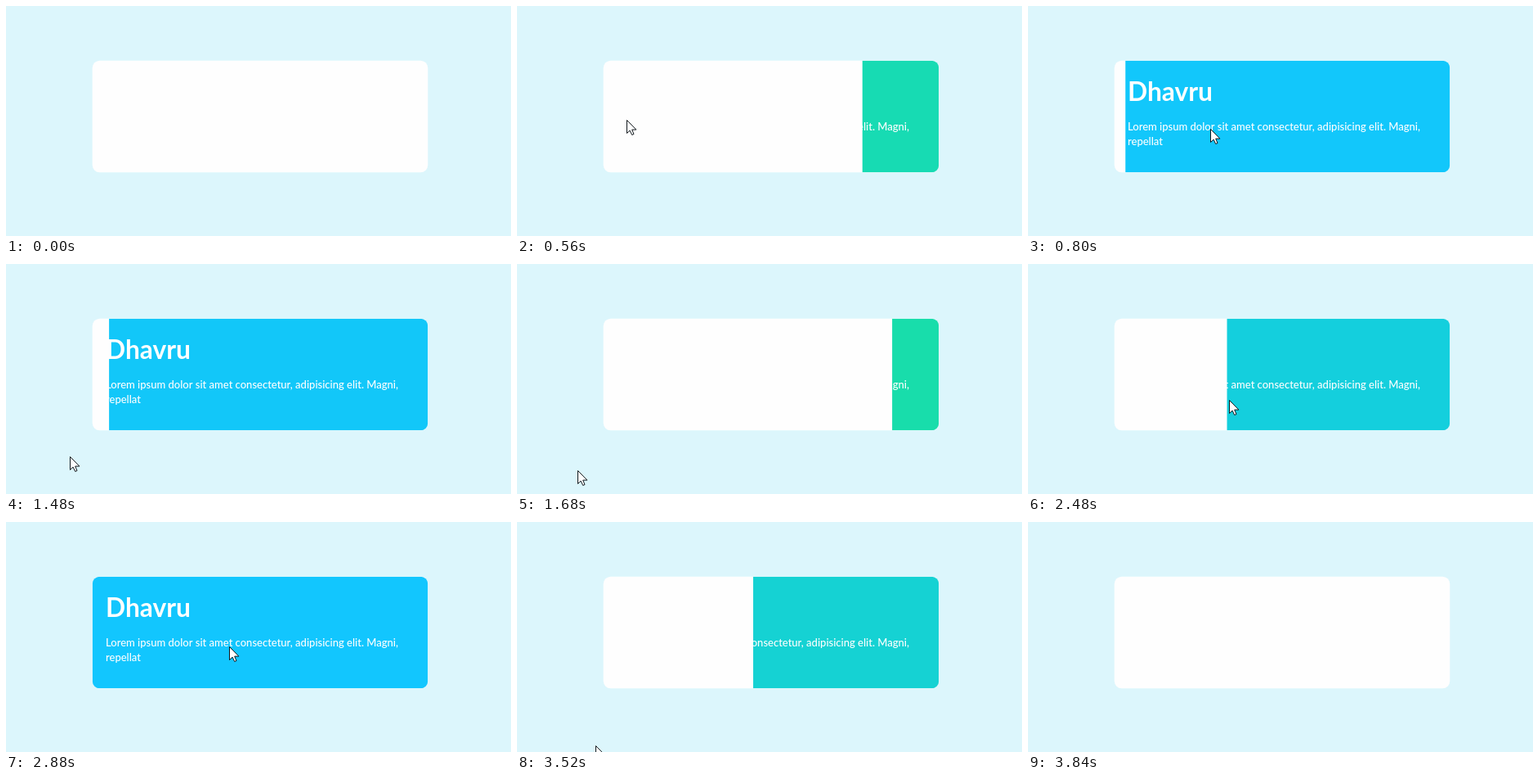
Write an HTML page with a canvas that moves like this. It is 618 px wide and 281 px high and loops after 4.04 s.

```html
<!DOCTYPE html>
<html lang="en">
<head>
<meta charset="utf-8">
<title>Wipe card</title>
<style>
  html, body { margin: 0; width: 100%; height: 100%; overflow: hidden; background: #dcf6fc; }
  canvas { display: block; width: 618px; height: 281px; }
</style>
</head>
<body>
<canvas id="stage"></canvas>
<script>
const W = 618, H = 281, LOOP = 4040, WIPE = 400;
const CARD = { x: 105.7, y: 66.7, w: 410.6, h: 136.6, r: 9 };
const FONT = 'Lato, "Open Sans", sans-serif';
const TITLE = 'Dhavru';
const LINES = ['Lorem ipsum dolor sit amet consectetur, adipisicing elit. Magni,', 'repellat'];
const WHITE = '#fefefe', GREEN = [25, 225, 157], BLUE = [18, 198, 254];

// Times at which the pointer enters and leaves the card, in turn
const HOVERS = [492, 1453.5, 2325, 3413];

// Pointer legs: where each ends, when it runs and at what pace
const steady = k => k;
const speedUp = k => k * k;
const slowDown = k => k * (2 - k);
const ENTRY = { x: 107, y: 192, at: 400 };
const LEGS = [
  { x: 134, y: 139, from: 400, to: 560, pace: steady },
  { x: 240, y: 152, from: 560, to: 960, pace: slowDown },
  { x: 78, y: 235, from: 1240, to: 1480, pace: steady },
  { x: 72, y: 257, from: 1480, to: 1880, pace: slowDown },
  { x: 273, y: 152, from: 2200, to: 2640, pace: slowDown },
  { x: 96, y: 273, from: 3160, to: 3520, pace: speedUp },
  { x: 98, y: 292, from: 3520, to: 3680, pace: steady }
];

const canvas = document.getElementById('stage');
const ctx = canvas.getContext('2d');
const dpr = window.devicePixelRatio || 1;
canvas.width = Math.round(W * dpr);
canvas.height = Math.round(H * dpr);
ctx.scale(dpr, dpr);

const mix = (a, b, k) => a + (b - a) * k;
const clamp = v => Math.min(1, Math.max(0, v));

// The CSS "ease" curve, cubic-bezier(.25, .1, .25, 1)
function ease(x) {
  if (x <= 0 || x >= 1) return clamp(x);
  const curve = (a, b, s) => 3 * a * s * (1 - s) ** 2 + 3 * b * s * s * (1 - s) + s ** 3;
  let lo = 0, hi = 1;
  for (let i = 0; i < 24; i++) {
    const mid = (lo + hi) / 2;
    if (curve(0.25, 0.25, mid) < x) lo = mid; else hi = mid;
  }
  return curve(0.1, 1, lo);
}

// Choose the font size at which the text has the given width
function fontFor(text, weight, width) {
  ctx.font = `${weight} 100px ${FONT}`;
  const size = 100 * width / ctx.measureText(text).width;
  return `${weight} ${size.toFixed(2)}px ${FONT}`;
}

const titleFont = fontFor(TITLE, 700, 104);
const bodyFont = fontFor(LINES[0], 500, 358);

// The picture refreshes more slowly near both ends of the loop
function snap(t) {
  const step = t < 1280 || t >= 3200 ? 80 : 40;
  return Math.floor(t / step) * step;
}

function wipeAt(t) {
  return clamp(HOVERS.reduce((p, at, i) => p + (i % 2 ? -1 : 1) * ease((t - at) / WIPE), 0));
}

function pointerAt(t) {
  let { x, y } = ENTRY;
  for (const leg of LEGS) {
    const k = leg.pace(clamp((t - leg.from) / (leg.to - leg.from)));
    x = mix(x, leg.x, k);
    y = mix(y, leg.y, k);
  }
  return [Math.round(x), Math.round(y)];
}

function drawCard(p) {
  const { x, y, w, h, r } = CARD;
  ctx.save();
  ctx.beginPath();
  ctx.roundRect(x, y, w, h, r);
  ctx.fillStyle = WHITE;
  ctx.fill();
  if (p > 0.001) {
    ctx.clip();
    ctx.fillStyle = `rgb(${GREEN.map((c, i) => Math.round(mix(c, BLUE[i], p)))})`;
    ctx.fillRect(x + w * (1 - p), y, w * p, h);
    ctx.fillStyle = WHITE;
    ctx.font = titleFont;
    ctx.fillText(TITLE, 122, 116);
    ctx.font = bodyFont;
    LINES.forEach((line, i) => ctx.fillText(line, 122, 152 + i * 18));
  }
  ctx.restore();
}

const arrow = new Path2D('M0 0V16L3.6 12.6L6.2 18L8.5 17L6.2 11.6H11.4Z');

function drawPointer([x, y]) {
  ctx.save();
  ctx.translate(x + 0.5, y + 0.5);
  ctx.fillStyle = '#fff';
  ctx.fill(arrow);
  ctx.strokeStyle = '#10171c';
  ctx.stroke(arrow);
  ctx.restore();
}

function draw(now) {
  const t = snap(now % LOOP);
  ctx.fillStyle = '#dcf6fc';
  ctx.fillRect(0, 0, W, H);
  drawCard(wipeAt(t));
  if (t >= ENTRY.at) drawPointer(pointerAt(t));
}

const start = performance.now();
function tick() {
  draw(performance.now() - start);
  requestAnimationFrame(tick);
}
tick();
</script>
</body>
</html>
```
